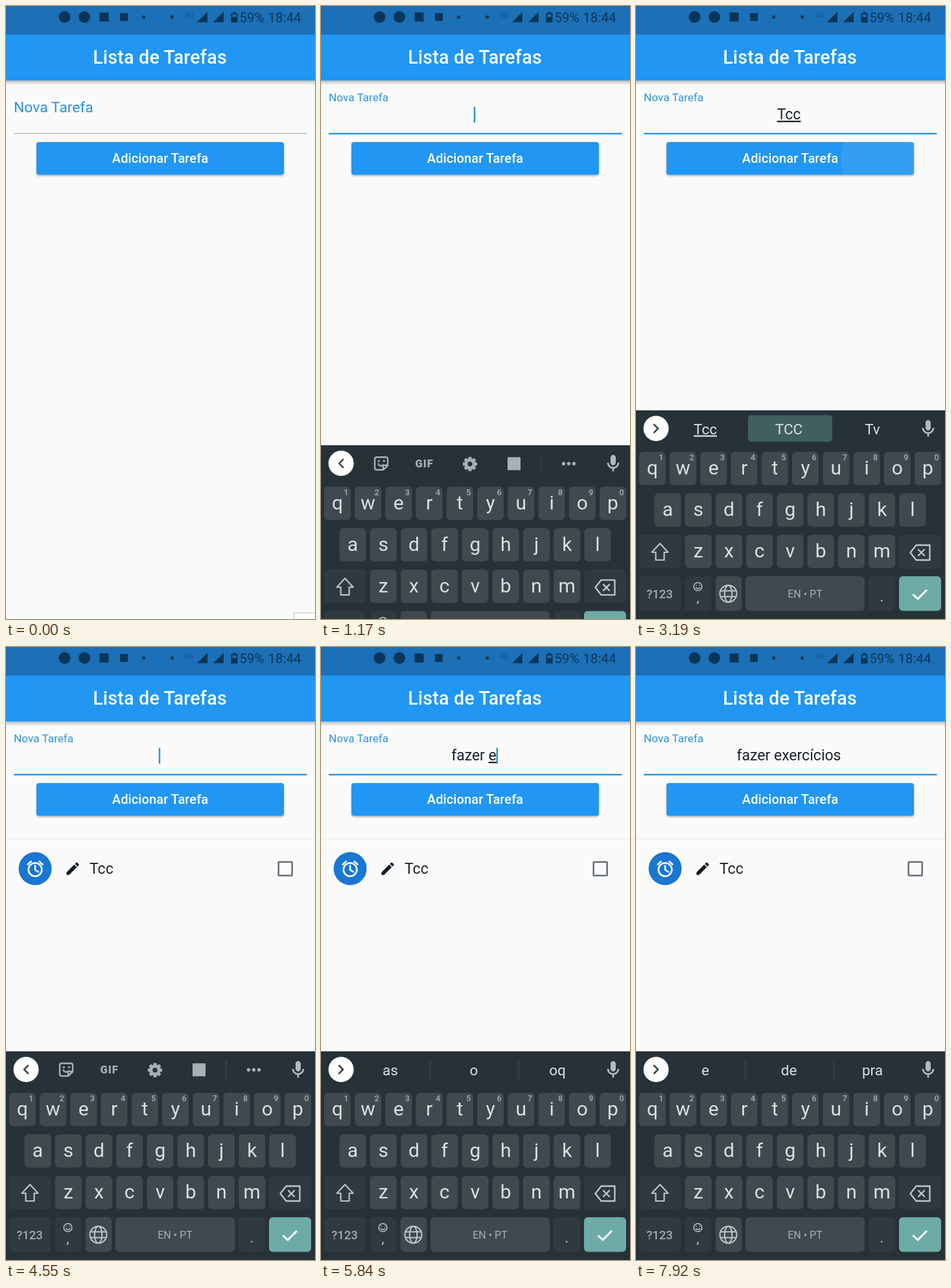
Animation of 477 by 946 pixels, one loop 7.99 s. Source, as an HTML page:

```html
<!DOCTYPE html>
<html lang="pt">
<head>
<meta charset="utf-8">
<title>Lista de Tarefas</title>
<style>
html, body { margin: 0; width: 100%; height: 100%; overflow: hidden; background: #fafafa; }
svg { display: block; width: 100%; height: 100%; font-family: Roboto, sans-serif; }
.line { fill: none; stroke-linecap: round; stroke-linejoin: round; }
.mid { text-anchor: middle; }
#comp { text-decoration: underline; text-decoration-thickness: 1.4px; }
</style>
</head>
<body>
<svg viewBox="0 0 477 946" preserveAspectRatio="none">
  <defs>
    <linearGradient id="fade" x2="0" y2="1">
      <stop stop-color="#000" stop-opacity=".25"/><stop offset="1" stop-color="#000" stop-opacity="0"/>
    </linearGradient>
    <filter id="soft" x="-5%" y="-20%" width="110%" height="150%">
      <feDropShadow dx="0" dy="1.5" stdDeviation="1.5" flood-opacity=".32"/>
    </filter>
    <clipPath id="btn"><rect x="47" y="210" width="382" height="50.500" rx="4"/></clipPath>
  </defs>
  <rect width="477" height="946" fill="#fafafa"/>

  <!-- app bar -->
  <rect y="115" width="477" height="7" fill="url(#fade)"/>
  <rect y="43" width="477" height="72" fill="#2196f3"/>
  <rect width="477" height="44" fill="#1b70b7"/>
  <g fill="#0b3558">
    <circle cx="90.500" cy="17" r="9"/>
    <circle cx="121" cy="17" r="9"/>
    <rect x="144.500" y="10" width="14" height="14"/>
    <rect x="176" y="11" width="12" height="12"/>
    <circle cx="212.500" cy="17" r="2.600"/>
    <circle cx="256.500" cy="17" r="2.600"/>
    <text x="276" y="18" font-size="11" opacity=".4">4G</text>
    <path d="M311 9V25H295ZM336 9V25H320Z"/>
    <path fill-rule="evenodd" d="M350.500 9h4v2h3v14.500h-10v-14.500h3zM349.500 13v4h6v-4z"/>
    <g font-size="20.500"><text x="360.500" y="25">59%</text><text x="404.500" y="25">18:44</text></g>
  </g>
  <text class="mid" x="237.500" y="89" font-size="28.600" font-weight="500" letter-spacing=".2" fill="#fff">Lista de Tarefas</text>

  <!-- form -->
  <text id="label" x="12" fill="#2c93de">Nova Tarefa</text>
  <text id="field" class="mid" x="236" y="175" font-size="23" fill="#1c242c"><tspan id="base" xml:space="preserve"></tspan><tspan id="comp"></tspan></text>
  <rect id="caret" y="155.500" width="2.400" height="24.500" fill="#2c8fda"/>
  <rect id="rule" x="12" width="452.500"/>
  <g filter="url(#soft)"><rect x="47" y="210" width="382" height="50.500" rx="4" fill="#2196f3"/></g>
  <g clip-path="url(#btn)"><circle id="ripple" cx="385" cy="235" fill="#fff"/></g>
  <text class="mid" x="238" y="242" font-size="20" font-weight="500" letter-spacing=".1" fill="#fff">Adicionar Tarefa</text>

  <!-- task -->
  <g id="task">
    <rect y="295.500" width="477" height="1.500" fill="#f0f0f0"/>
    <circle cx="45" cy="342" r="25.500" fill="#1976d2"/>
    <g class="line" stroke="#fff" stroke-width="2.600">
      <circle cx="45" cy="343.500" r="10.300"/>
      <path d="M45 337.500v6.500l5 3M33.500 335.500l5-4.500M56.500 335.500l-5-4.500"/>
    </g>
    <path transform="translate(90.200 329.200) scale(1.070)" fill="#141c24" d="M3 17.250V21h3.750L17.810 9.940l-3.750-3.750L3 17.250zM20.710 7.040c.39-.39.39-1.020 0-1.410l-2.340-2.340c-.39-.39-1.020-.39-1.410 0l-1.830 1.830 3.750 3.750z"/>
    <text x="129" y="350" font-size="23" fill="#1c242c">Tcc</text>
    <rect x="420.700" y="331.700" width="21" height="21" rx="1" fill="none" stroke="#68717c" stroke-width="2.600"/>
  </g>
  <path id="corner" d="M480 936.500H444.500V950H480Z" fill="#fff" stroke="#c4c4c8"/>

  <!-- keyboard -->
  <g id="board">
    <rect y="624" width="477" height="330" fill="#263238"/>
    <circle cx="31" cy="652" r="19.500" fill="#fff"/>
    <path id="chevron" class="line" stroke="#3c474d" stroke-width="2.600"/>
    <path transform="translate(434.900 636.300) scale(1.340)" fill="#b3b9bc" d="M12 14c1.660 0 3-1.340 3-3V5c0-1.660-1.340-3-3-3S9 3.340 9 5v6c0 1.660 1.340 3 3 3zm5-3c0 2.760-2.240 5-5 5s-5-2.240-5-5H5c0 3.530 2.610 6.430 6 6.920V21h2v-3.080c3.390-.49 6-3.390 6-6.920z"/>
    <g id="tools" fill="#a9b0b4" stroke="#a9b0b4">
      <g class="line" stroke-width="2.400">
        <path d="M86 642.500h14q3 0 3 3v10l-7 6.500h-10q-3 0-3-3v-13.500q0-3 3-3zM96 661.500v-6.500h6.500M88.500 653q3.500 5 7 1.500"/>
        <path d="M89 648.500h.5M97 648.500h.5" stroke-width="3"/>
      </g>
      <text x="145.500" y="658" font-size="16.500" font-weight="900" letter-spacing="1" stroke="none">GIF</text>
      <circle cx="230" cy="653" r="6.200" fill="none" stroke-width="5"/>
      <g id="teeth" stroke="none"></g>
      <rect x="288" y="642.500" width="20" height="20" stroke="none"/>
      <path d="M340 638v28" stroke="#3d484e" stroke-width="1.500"/>
      <g stroke="none"><circle cx="374.500" cy="652.500" r="2.700"/><circle cx="382.500" cy="652.500" r="2.700"/><circle cx="390.500" cy="652.500" r="2.700"/></g>
    </g>
    <g id="hints" font-size="22.500" fill="#dde1e3">
      <path id="bars" d="M168.500 637v31M305.500 637v31" stroke="#36434a" stroke-width="1.500"/>
      <rect id="chip" x="173" y="631.500" width="130" height="41" rx="5" fill="#3f5f60"/>
    </g>
    <g id="keys"></g>
    <path id="shift" class="line" d="M37 829.500L49.500 843H43.500V855H30.500V843H24.500Z" stroke="#b9c2c8" stroke-width="2.200"/>
    <g class="line" stroke="#c0c6ca" stroke-width="2.300">
      <path d="M432.500 832H453.500V855H432.500L423.500 843.500ZM436 839l9 9m0-9l-9 9"/>
      <path d="M427.500 908l7.500 7 14-14" stroke="#fff" stroke-width="3" stroke-linecap="butt" stroke-linejoin="miter"/>
      <g stroke-width="2"><circle cx="142.500" cy="907" r="13"/><ellipse cx="142.500" cy="907" rx="5.800" ry="13"/><path d="M131 902.500h23M131 911.500h23"/></g>
      <g stroke-width="1.500"><circle cx="95.500" cy="896" r="6.300"/><path d="M93 894h.2M98 894h.2M92.500 897.500q3 3.500 6 0"/></g>
    </g>
    <g class="mid" fill="#c9ced1">
      <text x="36.500" y="914" font-size="18.500" font-weight="500" fill="#a4abaf">?123</text>
      <text x="95.500" y="920" font-size="20">,</text>
      <text x="379.500" y="919" font-size="22">.</text>
      <text x="261" y="913" font-size="16" fill="#a9b0b4">EN • PT</text>
    </g>
  </g>
</svg>
<script>
const LOOP = 7990, PITCH = 47.25;
const FOCUS = 850, OPEN = 930, UPPER = 1400, PRESS = 3080, ADD = 3440;
const $ = id => document.getElementById(id);
const clamp = v => Math.max(0, Math.min(1, v));
const mix = (a, b, k) => a + (b - a) * k;

// time, settled text, text being composed, word hints
const steps = [
  [0, '', ''],
  [2040, '', 'T', 'T Tá Tudo'],
  [2380, '', 'Tc', 'Tc TCC Tv'],
  [2570, '', 'Tcc', 'Tcc TCC Tv'],
  [ADD, '', ''],
  [4690, '', 'f', 'f foi faz'],
  [4880, '', 'fa', 'fa faz fazer'],
  [5060, '', 'faz', 'faz fazer fazendo'],
  [5240, '', 'faze', 'faze fazer fazem'],
  [5420, '', 'fazer', 'fazer fazem fazerem'],
  [5600, 'fazer ', '', 'as o oq'],
  [5830, 'fazer ', 'e', 'as o oq'],
  [5970, 'fazer ', 'ex', 'ex exemplo exame'],
  [6200, 'fazer ', 'exe', 'exe exemplo exercício'],
  [6400, 'fazer ', 'exer', 'exer exercício exercer'],
  [6620, 'fazer ', 'exerc', 'exerc exercícios exercício'],
  [7060, 'fazer exercícios ', '', 'e de pra']
];

function add(parent, tag, attrs, text = '') {
  const el = document.createElementNS('http://www.w3.org/2000/svg', tag);
  for (const k in attrs) el.setAttribute(k, attrs[k]);
  el.textContent = text;
  return parent.appendChild(el);
}
function set(el, attrs) {
  for (const k in attrs) el.setAttribute(k, attrs[k]);
}
const show = (el, on) => el.style.display = on ? '' : 'none';
const put = (el, text) => { if (el.textContent !== text) el.textContent = text; };

const keys = $('keys'), LIGHT = '#40494e', DARK = '#2f3a40';
const key = (x, y, w, fill, h = 51.5) => add(keys, 'rect', { x, y, width: w, height: h, rx: 6, fill });
const letters = [];
['qwertyuiop', 'asdfghjkl', 'zxcvbnm'].forEach((row, r) => [...row].forEach((ch, i) => {
  const x = [4.8, 28.5, 75.7][r] + i * PITCH, y = 688 + 64 * r;
  key(x, y, 41, LIGHT);
  const el = add(keys, 'text', { x: x + 20.5, class: 'mid', 'font-size': 30, fill: '#dce0e2' });
  letters.push({ el, ch, y });
  if (!r) add(keys, 'text', { x: x + 34, y: 701, class: 'mid', 'font-size': 12.5, 'font-weight': 500, fill: '#a9b0b4' }, (i + 1) % 10);
}));
const shiftKey = key(4.8, 816, 64.5, DARK);
key(406, 816, 65, DARK);
[[4.8, 64.5, DARK], [75.7, 40.5, DARK], [122.7, 40.5, LIGHT], [169, 184, LIGHT], [359, 41, DARK], [406, 65, '#6eaaa6']]
  .forEach(([x, w, fill]) => key(x, 880, w, fill, 53.5));
for (let i = 0; i < 8; i++)
  add($('teeth'), 'rect', { x: 227.5, y: 642, width: 5, height: 5, transform: `rotate(${i * 45} 230 653)` });
const hints = [107, 236, 365].map(x => add($('hints'), 'text', { x, y: 660.5, class: 'mid' }));

function drawField(t, at, base, comp) {
  put($('base'), comp ? base : base.trim());
  put($('comp'), comp);
  const text = base + comp;
  const width = text ? $('field').getComputedTextLength() : 0;
  const gap = text.endsWith(' ') ? 5.7 : 0;
  $('caret').setAttribute('x', 235.8 + width / 2 + gap);
  const since = t - (at || FOCUS);
  show($('caret'), t >= OPEN && since % 1000 < 500);

  const k = clamp((t - OPEN) / 200), up = k * k * (3 - 2 * k);
  const lift = mix(up, 1 - (1 - k) ** 3, .8);
  set($('label'), { y: mix(164, 146.5, lift), 'font-size': mix(22.9, 17.2, lift) });
  const on = t >= OPEN;
  set($('rule'), { y: on ? 195.8 : 196, height: on ? 2.4 : 1.3, fill: on ? '#2c93e4' : '#b2b2bf' });
}

function drawBoard(t, comp, words) {
  const k = clamp((t - 970) / 340);
  set($('board'), { transform: `translate(0 ${322 * (1 - k) ** 2})` });
  show($('board'), k > 0);

  const upper = t >= UPPER && t < steps[1][0];
  for (const { el, ch, y } of letters) {
    put(el, upper ? ch.toUpperCase() : ch);
    el.setAttribute('y', y + (upper ? 37 : 35));
  }
  shiftKey.setAttribute('fill', upper ? '#596365' : DARK);
  $('shift').style.fill = upper ? '#b9c2c8' : 'none';

  const chip = comp.startsWith('Tc');
  show($('tools'), !words);
  show($('hints'), words);
  show($('chip'), chip);
  show($('bars'), !chip);
  $('chevron').setAttribute('d', words ? 'M28 646l6 6-6 6' : 'M34 646l-6 6 6 6');
  if (!words) return;
  const list = words.split(' ');
  hints.forEach((el, i) => {
    put(el, list[i]);
    el.style.textDecoration = list[i] === comp ? 'underline 1.4px' : 'none';
  });
}

function draw(t) {
  const [at, base, comp, words] = steps.findLast(s => s[0] <= t);
  drawField(t, at, base, comp);
  drawBoard(t, comp, words);
  set($('ripple'), {
    r: t < PRESS ? 0 : 30 + (t - PRESS) * .35,
    opacity: .08 * (1 - clamp((t - 3400) / 300))
  });
  show($('task'), t >= ADD);
  show($('corner'), t < 85);
}

const start = performance.now();
function tick() {
  draw((performance.now() - start) % LOOP);
  requestAnimationFrame(tick);
}
tick();
</script>
</body>
</html>
```
